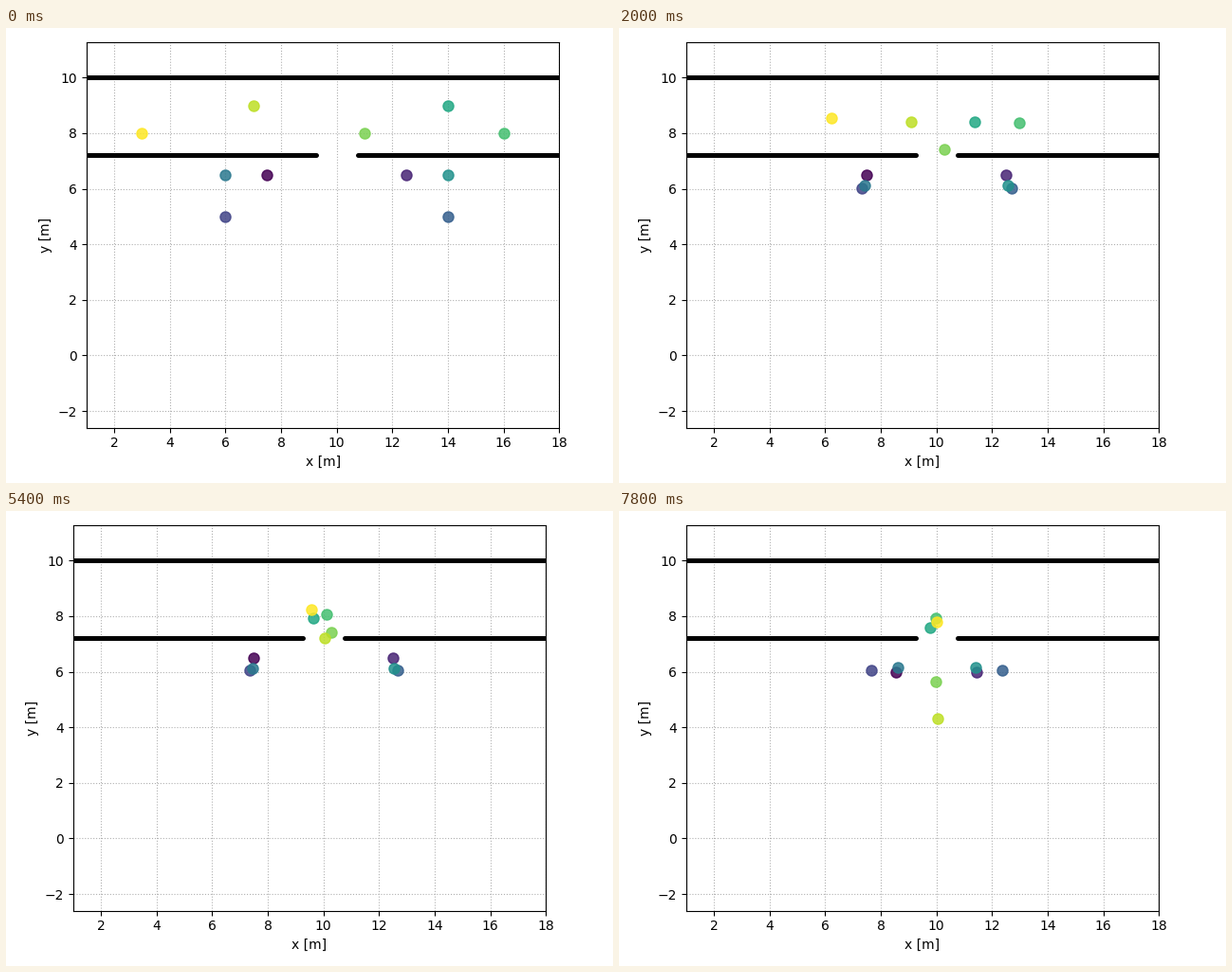
A matplotlib script that plays this animation: 640x480 px, repeating every 8 s.

```python
import numpy as np
import matplotlib.pyplot as plt
from matplotlib.animation import FuncAnimation

STEP = 0.2                      # seconds per frame
FRAMES = 40
DOOR_X = 10


def wait(start, rest, nudge, end):
    """Slow down into a waiting place, stand still, then set off."""
    def at(t):
        ease = 1 - (1 - min(t / 2.4, 1)) ** 2
        return [np.interp(t, (5.8, 6.4, 7.8), (a + (b - a) * ease, c, d))
                for a, b, c, d in zip(start, rest, nudge, end)]
    return at


def queue(*points):
    """Walk smoothly through a few points (cubic Hermite)."""
    times = np.array([0, 2.8, 5.4, 6.4, 7.8])
    pts = np.array(points, float)
    slopes = np.gradient(pts, times, axis=0)

    def at(t):
        k = min(np.searchsorted(times, t, side="right") - 1, len(times) - 2)
        h = times[k + 1] - times[k]
        u = (t - times[k]) / h
        rise = u * u * (3 - 2 * u)
        return (pts[k] * (1 - rise) + pts[k + 1] * rise
                + h * u * (1 - u) * (slopes[k] * (1 - u) - slopes[k + 1] * u))
    return at


def mirrored(*points):
    """The same wait on both sides of the door."""
    return wait(*points), wait(*[(2 * DOOR_X - x, y) for x, y in points])


agents = [
    *mirrored((7.5, 6.5), (7.5, 6.5), (7.56, 6.14), (8.56, 6.0)),
    *mirrored((6, 5), (7.34, 6.05), (7.15, 5.75), (7.65, 6.06)),
    *mirrored((6, 6.5), (7.46, 6.12), (7.83, 6.02), (8.6, 6.17)),
    queue((14, 9), (10.59, 8.21), (9.65, 7.92), (10.06, 8.15), (9.77, 7.58)),
    queue((16, 8), (12.0, 8.43), (10.11, 8.06), (9.82, 7.93), (9.99, 7.92)),
    wait((11, 8), (10.27, 7.41), (9.91, 7.43), (9.99, 5.63)),
    queue((7, 9), (9.7, 8.15), (10.04, 7.22), (9.96, 6.85), (10.06, 4.3)),
    queue((3, 8), (7.3, 8.66), (9.57, 8.24), (9.49, 8.15), (10.02, 7.78)),
]

fig, ax = plt.subplots(figsize=(6.4, 4.8), dpi=100)
ax.set(xlim=(1, 18), ylim=(-2.6, 11.271), xlabel="x [m]", ylabel="y [m]",
       xticks=range(2, 19, 2), yticks=range(-2, 11, 2))
ax.set_aspect("equal")
ax.grid(linestyle=":")

for x0, x1, y in ((1, 18, 10), (1, 9.25, 7.2), (10.75, 18, 7.2)):
    ax.plot((x0, x1), (y, y), "k", lw=3.6, solid_capstyle="round")

colors = plt.cm.viridis(np.linspace(0, 1, len(agents)))
dots = [ax.plot([], [], "o", color=c, ms=8, alpha=0.85)[0] for c in colors]

# The equal aspect makes the tight layout settle only after a few passes
lefts = []
for _ in range(3):
    fig.tight_layout()
    lefts.append(fig.subplotpars.left)


def update(i):
    fig.subplots_adjust(left=lefts[min(i, len(lefts) - 1)])
    for dot, agent in zip(dots, agents):
        x, y = agent(i * STEP)
        dot.set_data([x], [y])
    return dots


anim = FuncAnimation(fig, update, frames=FRAMES, interval=1000 * STEP,
                     repeat=True, repeat_delay=0, blit=False)
plt.show()
```
